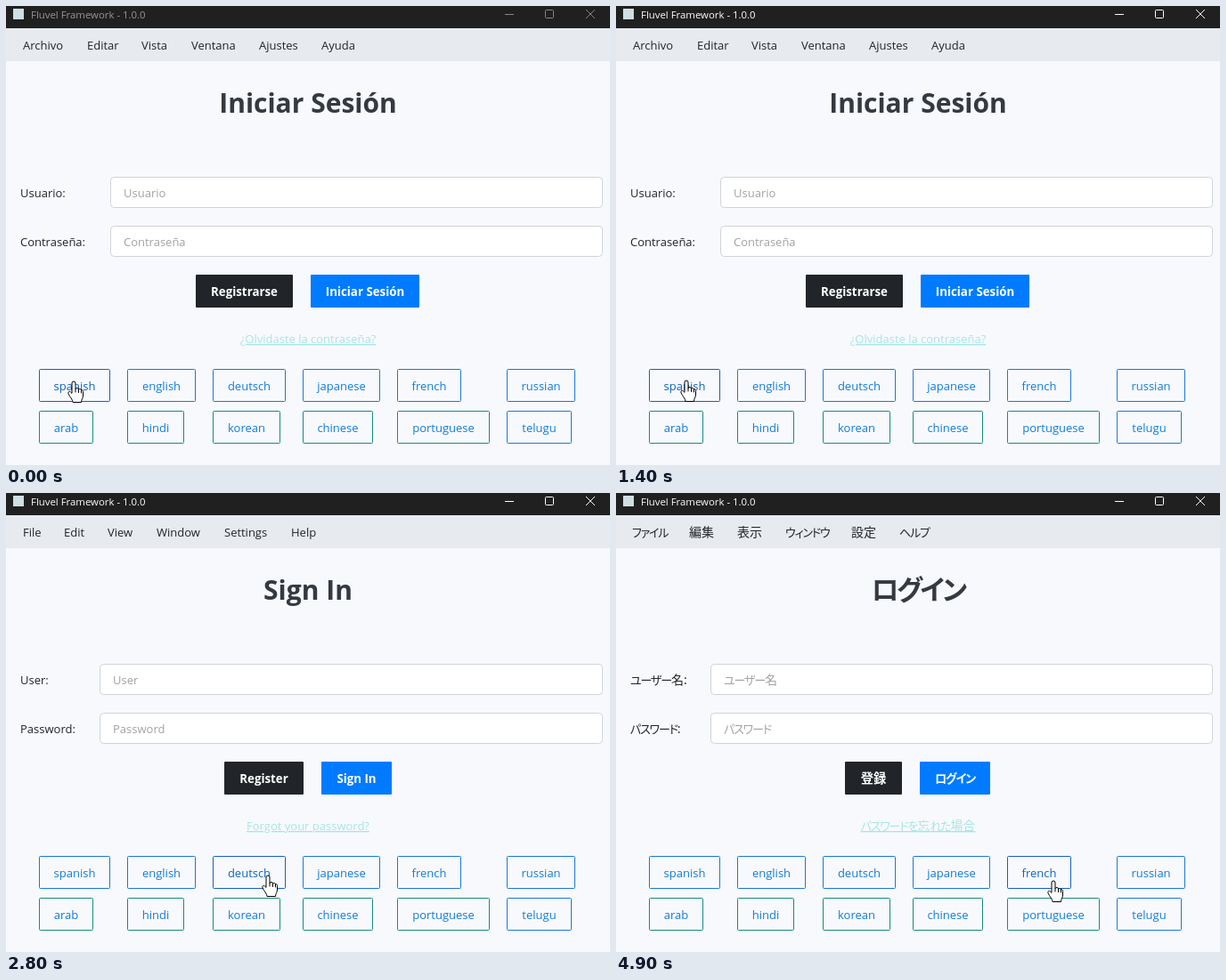
Animation of 678 by 516 pixels, one loop 5000 ms. Source, as an HTML page:

```html
<!DOCTYPE html>
<html lang="es">
<head>
<meta charset="utf-8">
<title>Fluvel Framework</title>
<style>
  html, body { margin: 0; width: 100%; height: 100%; overflow: hidden; background: #f8f9fd; }
  svg { display: block; width: 678px; height: 516px; }
  text { font: 13px "Open Sans", "Noto Sans CJK JP", "Noto Sans CJK", "Noto Sans", sans-serif; fill: #212529; }
  .ja text { font-family: "Noto Sans CJK JP", "Noto Sans CJK", "Open Sans", sans-serif; font-size: 14px; }
  .kana { font-size: .93em; font-feature-settings: "palt"; letter-spacing: -.09em; }
  .mid { text-anchor: middle; }
  text.head { font-size: 30px; font-weight: 700; fill: #343a40; }
  .ja text.head { font-size: 33px; }
  text.btn { font-size: 13.3px; font-weight: 700; fill: #fff; }
  .ja text.btn { font-size: 14.3px; }
  text.hint { fill: #a2a2a2; }
  text.link { fill: #a5e6e5; text-decoration: underline; }
  .field { fill: #fff; stroke: #ced4da; }
  .lang rect { fill: none; stroke: #1a78d2; }
  .lang.teal rect { stroke: #168a80; }
  .lang text { fill: #107cdc; }
  .lang.hover rect { stroke: #1560c0; }
  .lang.hover text { fill: #0b65c0; }
  #bar text { font-size: 11.4px; fill: #fff; }
  #bar path { fill: none; stroke: #fff; }
  #bar.idle text { fill: #969696; }
  #bar.idle path { stroke: #858585; }
</style>
</head>
<body>
<svg viewBox="0 0 678 516">
  <rect width="678" height="516" fill="#f8f9fd"/>
  <rect y="25" width="678" height="37" fill="#e7eaee"/>
  <rect width="678" height="25" fill="#202020"/>
  <g id="bar">
    <rect x="8" y="3" width="12" height="12" fill="#cfdfe2"/>
    <text x="28" y="14">Fluvel Framework - 1.0.0</text>
    <path d="M560 9.5H570M606.5 4.5H613.5Q614.5 4.5 614.5 5.5V12.5Q614.5 13.5 613.5 13.5H606.5Q605.5 13.5 605.5 12.5V5.5Q605.5 4.5 606.5 4.5ZM651 4L661 14M661 4L651 14"/>
  </g>
  <g id="form"></g>
  <g id="langs"></g>
  <g id="hand" stroke="#000" stroke-linejoin="round" stroke-linecap="round">
    <path fill="#fff" d="M-2 13V2A2 2 0 0 1 2 2V8.5C3 7 5.5 7.2 5.5 9C6.5 8 8.5 8.4 8.5 10C9.3 9.2 10.5 9.8 10.5 11.5V16C10.5 19 8.5 20 8.5 23.5H-1C-1 21 -3 19 -4.5 16.5L-6 13.8C-6.5 11.5 -4.6 10.5 -3.4 12Z"/>
    <path fill="none" d="M2 8.5V12M5.5 9.2V12.5M8.5 10.2V13"/>
  </g>
</svg>
<script>
const LOOP = 5000, STEP = 100;
const $ = id => document.getElementById(id);

// field: left edge of the inputs; buttons: left edge, first width, second width
const words = {
  es: {
    menu: ["Archivo", "Editar", "Vista", "Ventana", "Ajustes", "Ayuda"],
    menuX: [19, 91, 152, 208, 284, 354],
    title: "Iniciar Sesión", user: "Usuario", pass: "Contraseña", field: 117,
    register: "Registrarse", buttons: [213, 109, 122], forgot: "¿Olvidaste la contraseña?"
  },
  en: {
    menu: ["File", "Edit", "View", "Window", "Settings", "Help"],
    menuX: [19, 65, 114, 169, 245, 320],
    title: "Sign In", user: "User", pass: "Password", field: 105,
    register: "Register", buttons: [245, 89, 79], forgot: "Forgot your password?"
  },
  de: {
    menu: ["Datei", "Bearbeiten", "Ansicht", "Fenster", "Einstellungen", "Hilfe"],
    menuX: [19, 77, 168, 239, 310, 417],
    title: "Anmelden", user: "Benutzername", pass: "Passwort", field: 135,
    register: "Registrieren", buttons: [220, 115, 102], forgot: "Passwort vergessen?"
  },
  ja: {
    menu: ["ファイル", "編集", "表示", "ウィンドウ", "設定", "ヘルプ"],
    menuX: [18, 82, 136, 190, 264, 318],
    title: "ログイン", user: "ユーザー名", pass: "パスワード", field: 106,
    register: "登録", buttons: [257, 64, 79], forgot: "パスワードを忘れた場合"
  }
};

const colX = [37, 136, 232, 333, 439, 562];
const rows = [
  { y: 408, names: ["spanish", "english", "deutsch", "japanese", "french", "russian"], w: [80, 77, 82, 87, 72, 77] },
  { y: 455, names: ["arab", "hindi", "korean", "chinese", "portuguese", "telugu"], w: [61, 64, 76, 79, 104, 73] }
];

const switches = [[0, "es"], [2200, "en"], [3200, "de"], [4600, "ja"]];
const ACTIVE_AT = 900;

// time, x, y of the fingertip
const route = [
  [0, 76, 422], [1300, 76, 422], [1400, 79, 421], [1500, 95, 424], [1600, 135, 433],
  [1700, 172, 431], [1800, 184, 427], [2400, 184, 427], [2500, 203, 428], [2600, 241, 430],
  [2700, 280, 430], [2800, 294, 430], [3500, 294, 430], [3600, 390, 433], [4600, 390, 433],
  [4700, 420, 434], [4800, 468, 435], [4900, 491, 436], [5000, 491, 436]
];

const kana = s => s.replace(/[\u3040-\u30ff]+/g, k => `<tspan class="kana">${k}</tspan>`);
const text = (x, y, s, cls = "") => `<text x="${x}" y="${y}" class="${cls}">${kana(s)}</text>`;
const box = (x, y, w, h, attrs = "") => `<rect x="${x}" y="${y}" width="${w}" height="${h}" ${attrs}/>`;

function input(y, label, left) {
  return text(16, y + 23, label + ":") +
    box(left + .5, y + .5, 669 - left, 34, 'rx="4" class="field"') +
    text(left + 15, y + 23, label, "hint");
}

function button(x, w, label, color) {
  return box(x, 302, w, 37, `rx="1" fill="${color}"`) + text(x + w / 2, 326, label, "btn mid");
}

function drawForm(lang) {
  const t = words[lang], [x, w1, w2] = t.buttons;
  $("form").setAttribute("class", lang);
  $("form").innerHTML =
    t.menu.map((s, i) => text(t.menuX[i], 49, s)).join("") +
    text(339, 120, t.title, "head mid") +
    input(192, t.user, t.field) + input(247, t.pass, t.field) +
    button(x, w1, t.register, "#212529") + button(x + w1 + 20, w2, t.title, "#007bff") +
    text(339, 379, t.forgot, "link mid");
}

const choices = rows.flatMap(({ y, names, w }, r) => names.map((name, i) => {
  const g = document.createElementNS("http://www.w3.org/2000/svg", "g");
  g.innerHTML = box(colX[i] + .5, y + .5, w[i] - 1, 36, 'rx="1"') +
    text(colX[i] + w[i] / 2, y + 24, name, "mid");
  $("langs").append(g);
  return { g, x: colX[i], y, w: w[i], cls: r && i < 5 ? "lang teal" : "lang" };
}));

function fingertip(t) {
  const i = route.findIndex(p => p[0] > t);
  const [t0, x0, y0] = route[i - 1], [t1, x1, y1] = route[i];
  const k = (t - t0) / (t1 - t0);
  return [x0 + (x1 - x0) * k, y0 + (y1 - y0) * k];
}

let shown;
function draw(time) {
  const t = Math.floor(time % LOOP / STEP) * STEP;
  const lang = switches.filter(s => s[0] <= t).pop()[1];
  if (lang !== shown) drawForm(shown = lang);
  $("bar").setAttribute("class", t < ACTIVE_AT ? "idle" : "");
  const [x, y] = fingertip(t);
  $("hand").setAttribute("transform", `translate(${x} ${y})`);
  for (const c of choices) {
    const over = x >= c.x && x < c.x + c.w && y >= c.y && y < c.y + 37;
    c.g.setAttribute("class", c.cls + (over ? " hover" : ""));
  }
}

const start = performance.now();
function tick() {
  draw(performance.now() - start);
  requestAnimationFrame(tick);
}
tick();
</script>
</body>
</html>
```
